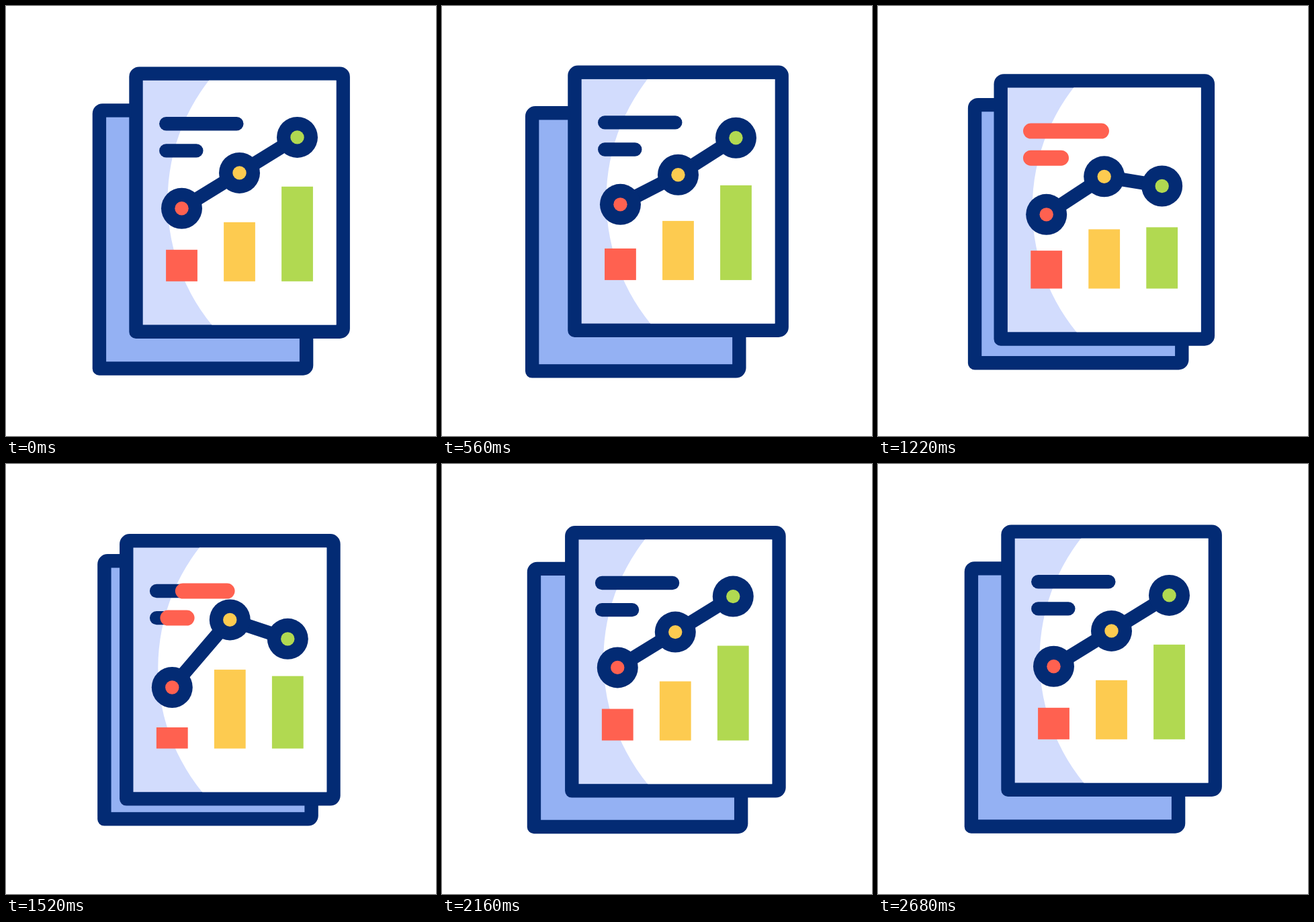
Write an HTML page with a canvas that moves like this. It is 640 px wide and 640 px high and loops after 2980 ms.

```html
<!DOCTYPE html>
<html lang="en">
<head>
<meta charset="utf-8">
<title>Report</title>
<style>
  html, body { margin: 0; width: 100%; height: 100%; overflow: hidden; background: #fff; }
  canvas { display: block; width: 640px; height: 640px; }
</style>
</head>
<body>
<canvas id="stage" width="640" height="640"></canvas>
<script>
const ctx = document.getElementById('stage').getContext('2d');
const LOOP = 2980;
const NAVY = '#032b74', RED = '#ff6150', YELLOW = '#fdcb50', GREEN = '#b1d951';

// Sheet spread: outward, slowly together, outward, back to rest.
const OPEN_AT = 300, REOPEN_AT = 2310, SPREAD = 16.8;
const spreadKeys = [[80, 0], [OPEN_AT, SPREAD], [560, 4], [840, -5.2], [1220, -10.8], [1620, -14.6],
  [1860, -14], [2240, 5.8], [REOPEN_AT, SPREAD], [2340, 16.2], [2680, 0]];

const columns = [
  { x: 261.5, y: 301.2, height: 47, color: RED,
    dot: [[480, 0], [860, -34], [1480, 18], [1915, 0]],
    bar: [[560, 0], [890, 34], [1560, -16], [1940, 0]] },
  { x: 347.5, y: 248.4, height: 88, color: YELLOW,
    dot: [[475, 0], [860, 37], [1480, -31], [1915, 0]],
    bar: [[560, 0], [890, -28.5], [1560, 30], [1940, 0]] },
  { x: 433.5, y: 195.4, height: 141, color: GREEN,
    dot: [[450, 0], [1340, 65], [1950, 0]],
    bar: [[560, 0], [1130, -51], [2110, 0]] }
];
const textLines = [[175.3, 105], [215.4, 45]];

// Monotone cubic through [time, value] keys, flat at turning points.
function curve(keys, t) {
  const last = keys.length - 1;
  if (t <= keys[0][0]) return keys[0][1];
  if (t >= keys[last][0]) return keys[last][1];
  const i = keys.findIndex(key => key[0] > t) - 1;
  const secant = k => (keys[k + 1][1] - keys[k][1]) / (keys[k + 1][0] - keys[k][0]);
  const slope = k => {
    if (k === 0 || k === last) return 0;
    const a = secant(k - 1), b = secant(k);
    return a * b > 0 ? 2 * a * b / (a + b) : 0;
  };
  const [t0, v0] = keys[i], [t1, v1] = keys[i + 1];
  const d = t1 - t0, s = (t - t0) / d, r = 1 - s;
  return v0 * r * r * (1 + 2 * s) + v1 * s * s * (3 - 2 * s)
    + d * s * r * (slope(i) * r - slope(i + 1) * s);
}

function offsets(u) {
  const backX = -0.672 * u - 2.1;
  return [u, 1.5 - 0.858 * u, backX, 14 - 1.227 * (backX + 13)];
}

function sheetOffsets(t) {
  const u = curve(spreadKeys, t);
  return t < OPEN_AT || t > REOPEN_AT ? offsets(SPREAD).map(v => v * u / SPREAD) : offsets(u);
}

function sheet(x, y, fill) {
  ctx.fillStyle = NAVY;
  ctx.beginPath();
  ctx.roundRect(x, y, 328.6, 404.5, [15, 15, 15, 10]);
  ctx.fill();
  ctx.fillStyle = fill;
  ctx.fillRect(x + 20.4, y + 20.4, 287.8, 363.7);
}

function circle(x, y, r, color) {
  ctx.fillStyle = color;
  ctx.beginPath();
  ctx.arc(x, y, r, 0, 2 * Math.PI);
  ctx.fill();
}

function stroke(points, width, color) {
  ctx.strokeStyle = color;
  ctx.lineWidth = width;
  ctx.beginPath();
  points.forEach(p => ctx.lineTo(...p));
  ctx.stroke();
}

function drawText(t) {
  const from = curve([[1330, 0], [1790, 1]], t), to = curve([[640, 0], [1105, 1]], t);
  for (const [y, length] of textLines) {
    stroke([[238.3, y], [238.3 + length, y]], 20.4, NAVY);
    if (to > from) stroke([[238.3 + length * from, y], [238.3 + length * to, y]], 23, RED);
  }
}

function drawChart(t) {
  for (const c of columns) {
    const height = c.height + curve(c.bar, t);
    ctx.fillStyle = c.color;
    ctx.fillRect(c.x - 23.4, 409.8 - height, 46.8, height);
  }
  const dots = columns.map(c => [c.x, c.y + curve(c.dot, t)]);
  stroke(dots, 20.4, NAVY);
  dots.forEach(([x, y], i) => {
    circle(x, y, 30.5, NAVY);
    circle(x, y, 10.2, columns[i].color);
  });
}

function draw(t) {
  const [frontX, frontY, backX, backY] = sheetOffsets(t);
  ctx.fillStyle = '#fff';
  ctx.fillRect(0, 0, 640, 640);
  sheet(128.7 + backX, 145.2 + backY, '#94b1f3');

  ctx.save();
  ctx.translate(frontX, frontY);
  sheet(183.3, 90.4, '#d2dcfd');
  ctx.save();
  ctx.beginPath();
  ctx.rect(203.7, 110.8, 287.8, 363.7);
  ctx.clip();
  circle(532.5, 290, 292, '#fff');
  ctx.restore();
  drawText(t);
  drawChart(t);
  ctx.restore();
}

ctx.lineCap = ctx.lineJoin = 'round';
const start = performance.now();
function tick() {
  draw((performance.now() - start) % LOOP);
  requestAnimationFrame(tick);
}
tick();
</script>
</body>
</html>
```
